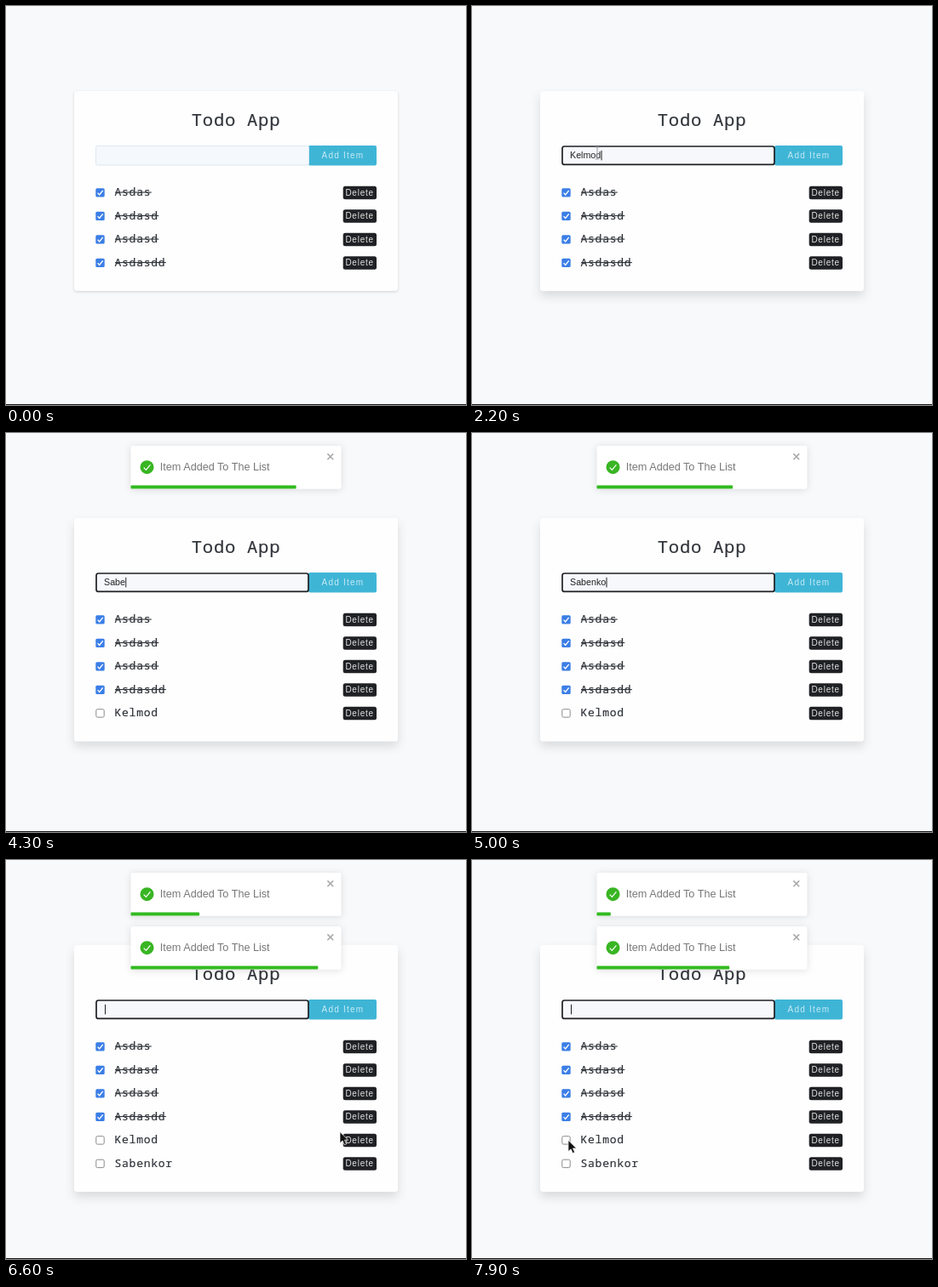
An HTML page that plays this animation: 540 px wide and 469 px high, repeating every 8 s.

```html
<!DOCTYPE html>
<html lang="en">
<head>
<meta charset="utf-8">
<title>Todo App</title>
<style>
html, body { margin: 0; height: 100%; overflow: hidden; background: #f8f9fb; }
svg { display: block; width: 100vw; height: 100vh; }
text { font-family: "Liberation Sans", Arial, sans-serif; white-space: pre; }
.mono { font-family: "Noto Sans Mono", "DejaVu Sans Mono", monospace; letter-spacing: .75px; fill: #30343a; stroke: #30343a; stroke-width: .2px; }
.title { font-size: 20.5px; }
.item { font-size: 13px; }
.delete { font-size: 10px; letter-spacing: .75px; fill: #e2e2e2; }
.add { font-size: 10px; letter-spacing: 1.2px; fill: #c8eaf4; }
.typed { font-size: 10.7px; fill: #222; }
.note { font-size: 12.65px; fill: #787878; }
.toast { filter: drop-shadow(0 1px 4px rgba(0, 0, 0, .12)); }
</style>
</head>
<body>
<svg id="stage" viewBox="0 0 540 469" preserveAspectRatio="none"></svg>
<script>
const LOOP = 8000, STEP = 100;
const stage = document.getElementById('stage');
const pen = document.createElement('canvas').getContext('2d');
pen.font = '10.7px "Liberation Sans", Arial, sans-serif';

const doneItems = ['Asdas', 'Asdasd', 'Asdasd', 'Asdasdd'];
const focusAt = 1100;
const entries = [
  { name: 'Kelmod', keys: [1400, 1600, 1800, 1900, 2000, 2200], added: 2500, toastAt: 2530 },
  { name: 'Sabenkor', keys: [3600, 3800, 4000, 4200, 4600, 4700, 4900, 5100], added: 5400, toastAt: 5350 }
];
const resets = [focusAt, ...entries.flatMap(e => [...e.keys, e.added + 10])];

// [time, x, y] of the pointer
const pointerPath = [
  [0, 347, 178], [100, 347, 178], [500, 147, 173], [6200, 147, 173],
  [6600, 392, 319.6], [6900, 392, 319.6], [7500, 113, 329.4], [8000, 113, 329.4]
];

const easeOut = p => 1 - (1 - p) ** 3;
const smooth = p => p * p * (3 - 2 * p);
const clamp = v => Math.max(0, Math.min(1, v));

function along(points, t, ease) {
  const i = Math.max(1, points.findIndex(p => p[0] >= t));
  const [a, b] = [points[i - 1], points[i]];
  const k = ease(clamp((t - a[0]) / (b[0] - a[0])));
  return a.slice(1).map((v, j) => v + (b[j + 1] - v) * k);
}

const box = (x, y, w, h, fill, r = 0, more = '') =>
  `<rect x="${x}" y="${y}" width="${w}" height="${h}" rx="${r}" fill="${fill}" ${more}/>`;
const line = (d, color, width) =>
  `<path d="${d}" fill="none" stroke="${color}" stroke-width="${width}"/>`;
const label = (x, y, cls, str) =>
  `<text x="${x}" y="${y}" class="${cls}">${str}</text>`;

function row(name, i, done) {
  const y = 219.4 + 27.5 * i;
  const check = done
    ? box(105.3, y - 5.2, 10.4, 10.4, '#3b7ee6', 1.6) +
      line(`M107.6 ${y + .2}l2.1 2.3l4 -5`, '#fff', 1.4)
    : box(105.8, y - 4.7, 9.4, 9.4, '#fff', 1.6, 'stroke="#8a8a8a"');
  const strike = done ? box(128, y - .9, name.length * 8.55, 1.1, '#30343a') : '';
  return check + label(127.5, y + 3.9, 'mono item', name) + strike +
    box(395.7, y - 7.6, 39.3, 15.4, '#202124', 2.5) +
    label(398.4, y + 3.5, 'delete', 'Delete');
}

function field(t) {
  if (t < focusAt) return box(105.5, 164.5, 250, 22.5, '#f5f8fc', 2, 'stroke="#dce8f3"');
  const entry = entries.find(e => t < e.added);
  const typed = entry ? entry.name.slice(0, entry.keys.filter(k => k <= t).length) : '';
  const since = t - Math.max(...resets.filter(r => r <= t));
  const caretX = 115 + pen.measureText(typed).width + (typed ? .3 : 1);
  const caret = since % 1000 < 500 ? box(caretX, 169.8, 1, 11.6, '#222') : '';
  return box(106, 165, 249, 21.4, '#f6f8fb', 2.5, 'stroke="#1d1f23" stroke-width="1.7"') +
    label(115, 179.4, 'typed', typed) + caret;
}

function card(t, items) {
  const lift = clamp((t - 100) / 300);
  const h = 125 + 27.5 * items.length;
  const shadow = `style="filter:drop-shadow(0 ${1 + 5 * lift}px ${1.5 + 4.5 * lift}px rgba(0,0,0,${.16 - .04 * lift}))"`;
  return box(80, 100, 380, h, '#fefefe', 3.5, shadow) +
    label(217.8, 140.9, 'mono title', 'Todo App') +
    box(355, 164, 80, 23.4, '#3fb5d6', 2) + label(370.6, 179.2, 'add', 'Add Item') +
    field(t) + items.map((name, i) => row(name, i, i < doneItems.length)).join('');
}

function toast(t, start, slot) {
  const age = t - start;
  if (age < 0) return '';
  const drop = [[0, -2316, 0], [420, 19, 1], [525, -7.7, 1], [630, 3.9, 1], [700, 0, 1], [LOOP, 0, 1]];
  const [dy, alpha] = along(drop, age, easeOut);
  const left = 247 * (1 - clamp((age - 700) / 5000));
  return `<g class="toast" opacity="${alpha}" transform="translate(146.5 ${15 + 63 * slot + dy})">` +
    box(0, 0, 247, 50.8, '#fff', 2.5) +
    '<circle cx="19" cy="25.2" r="8" fill="#39b523"/>' +
    line('M15.2 25.6l2.7 2.7l5 -5.9', '#fff', 1.2) +
    label(34.3, 29.4, 'note', 'Item Added To The List') +
    line('M230.9 9.4l6.8 6.8m0 -6.8l-6.8 6.8', '#a8a8a8', 1.5) +
    box(0, 46.6, left, 4, '#33ba20', .8) + '</g>';
}

function pointer(t) {
  if (t >= 2500 && t < 6200) return '';
  const [x, y] = along(pointerPath, t, smooth);
  if (y < 187) {
    if (t < 100) return '';
    return line(`M${x - 2.5} ${y - 7}h5m-2.5 0v14m-2.5 0h5`, '#a5a8ad', 1.1);
  }
  return `<path transform="translate(${x} ${y})" d="M0 0V13.2L3.1 10.4L5.2 15.2L7.6 14.2L5.5 9.5H9.6Z" fill="#111" stroke="#fff" stroke-width=".7"/>`;
}

function draw(now) {
  const t = Math.floor(now % LOOP / STEP) * STEP;
  const items = doneItems.concat(entries.filter(e => e.added <= t).map(e => e.name));
  stage.innerHTML = box(0, 0, 540, 469, '#f8f9fb') + card(t, items) +
    entries.map((e, i) => toast(t, e.toastAt, i)).join('') +
    pointer(t) + box(0, 468, 540, 1, '#17181a');
}

let begin;
function tick(now) {
  begin ??= now;
  draw(now - begin);
  requestAnimationFrame(tick);
}
draw(0);
requestAnimationFrame(tick);
</script>
</body>
</html>
```
